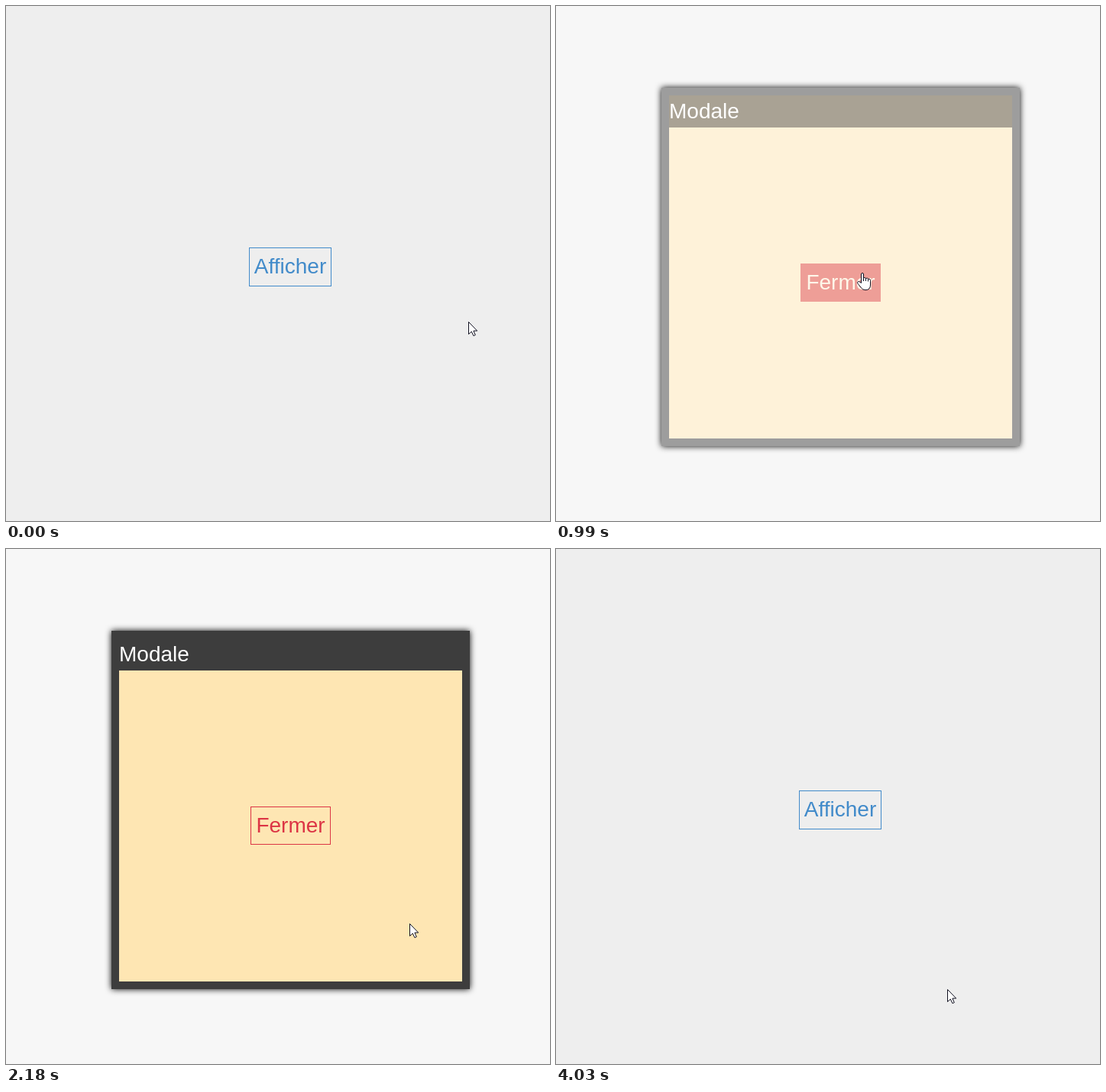
An HTML page for the animation above (4100 ms loop, 712 by 674 pixels).

```html
<!DOCTYPE html>
<html lang="fr">
<head>
<meta charset="utf-8">
<title>Modale</title>
<style>
  html, body { margin: 0; width: 100%; height: 100%; overflow: hidden; background: #eee; }
  svg { display: block; width: 712px; height: 674px; }
  text { font: 28px "Liberation Sans", Arial, sans-serif; }
  .cursor { fill: #fff; stroke: #101020; stroke-width: 1; stroke-linejoin: round; }
</style>
</head>
<body>
<svg viewBox="0 0 712 674">
  <defs>
    <filter id="blur" x="-10%" y="-10%" width="120%" height="120%">
      <feGaussianBlur stdDeviation="4"/>
    </filter>
  </defs>

  <rect id="page" width="712" height="674"/>

  <g id="open">
    <rect class="ring" fill="none" stroke="#428bca"/>
    <rect class="box" x="318.5" y="316.5" width="107" height="50" fill="#428bca" stroke="#428bca"/>
    <text x="372" y="350" text-anchor="middle">Afficher</text>
  </g>

  <g id="modal">
    <rect x="138" y="107" width="469" height="469" filter="url(#blur)"/>
    <rect x="138" y="107" width="469" height="469" fill="#fff"/>
    <g id="panel">
      <rect x="138" y="107" width="469" height="469" fill="#3d3d3d"/>
      <rect x="148" y="117" width="449" height="449" fill="#fff"/>
    </g>
    <rect id="body" x="148" y="117" width="449" height="449" fill="#fee6b3"/>
    <g id="content">
      <rect x="148" y="117" width="449" height="42" fill="#3d3d3d"/>
      <g id="close">
        <rect class="ring" fill="none" stroke="#dc3545"/>
        <rect class="box" x="320.5" y="337.5" width="104" height="49" fill="#dc3545" stroke="#dc3545"/>
        <text x="372.5" y="371" text-anchor="middle">Fermer</text>
      </g>
    </g>
    <text x="148" y="147" fill="#fff">Modale</text>
  </g>

  <g id="cursor" class="cursor">
    <path id="arrow" d="M.5 .5V16.5L4.3 13.1L6.9 18.6L9.3 17.6L6.9 12.1H11.7Z"/>
    <g id="hand">
      <path d="M-.5 13.5V2Q-.5.5 1 .5T2.5 2V7.5Q3 6.3 4.2 6.5Q5.5 6.7 5.5 8Q6 6.9 7.2 7.1Q8.5 7.4 8.5 8.8Q9 8 10 8.2Q11.5 8.6 11.5 10.5V16Q11.5 22.7 5 22.7Q1.2 22.7-.7 19.6L-4.8 14.5Q-6.3 12.4-4.6 11.6Q-3.2 11-.5 13.5Z"/>
      <path fill="none" d="M2.5 7.5V11M5.5 8V11M8.5 8.8V11.5"/>
    </g>
  </g>
  <circle id="click" r="12" fill="#ffd800" opacity=".6"/>
</svg>
<script>
const LOOP = 4100;
const OPENED = 740, CLOSED = 3480;
const CLICKS = { open: 600, close: 3290 };
const $ = id => document.getElementById(id);
const ramp = (t, from, to) => Math.max(0, Math.min(1, (t - from) / (to - from)));
const show = (el, on) => el.setAttribute('display', on ? 'inline' : 'none');
const mix = (a, b, k) => `rgb(${a.map((v, i) => Math.round(v + (b[i] - v) * k))})`;

// Each move jumps through its points at even intervals between two times.
const MOVES = [
  { from: -1, to: 0, points: [[605, 413]] },
  { from: 60, to: 540, points: [[600, 412], [580, 408], [540, 398], [490, 382], [445, 367], [418, 356], [404, 351], [400, 349]] },
  { from: 1540, to: 1800, points: [[410, 357], [445, 395], [490, 455], [520, 498], [527, 508]] },
  { from: 2180, to: 2640, points: [[528, 490], [530, 440], [528, 375], [525, 310], [505, 250], [486, 215], [500, 160], [522, 126]] },
  { from: 2740, to: 3210, points: [[530, 92], [515, 105], [470, 175], [410, 265], [390, 310], [382, 345], [379, 368], [378, 374]] },
  { from: 3290, to: 3291, points: [[378, 380]] },
  { from: 3880, to: 4030, points: [[410, 427], [465, 507], [512, 576]] }
];

function cursorAt(t) {
  const { from, to, points } = MOVES.filter(m => m.from <= t).pop();
  const last = points.length - 1;
  return points[Math.min(last, Math.floor((t - from) / (to - from) * last + 1e-6))] || points[last];
}

function makeButton(id, color) {
  const group = $(id);
  const box = group.querySelector('.box');
  const ring = group.querySelector('.ring');
  const label = group.querySelector('text');
  const [x, y, w, h] = ['x', 'y', 'width', 'height'].map(name => +box.getAttribute(name));
  return {
    contains: (px, py) => px >= x && px <= x + w && py >= y && py <= y + h,
    draw(hover, focus) {
      box.setAttribute('fill-opacity', hover);
      label.setAttribute('fill', mix(color, [255, 255, 255], hover));
      const size = 3 * focus, gap = 0.5 + size / 2;
      const attrs = { x: x - gap, y: y - gap, width: w + 2 * gap, height: h + 2 * gap,
        'stroke-width': size, 'stroke-opacity': focus / 2 };
      for (const name in attrs) ring.setAttribute(name, attrs[name]);
    }
  };
}

const openButton = makeButton('open', [66, 139, 202]);
const closeButton = makeButton('close', [220, 53, 69]);

function draw(t) {
  const modal = t >= OPENED && t < CLOSED;
  $('page').setAttribute('fill', modal ? '#f7f7f7' : '#eee');
  show($('modal'), modal);
  show($('open'), !modal);

  const fadeTime = 780 + Math.floor((t - 780) / 70) * 70;
  const fade = ramp(fadeTime, OPENED, 1240);
  $('panel').setAttribute('opacity', fade);
  $('body').setAttribute('opacity', fade);
  $('content').setAttribute('opacity', fade < 1 ? fade * 0.88 : 1);

  const openHover = t < OPENED ? ramp(t, 390, 540) : 0;
  const closeHover = t < 2000 ? 1 - ramp(t, 1580, 1750) : ramp(t, 3060, 3210);
  openButton.draw(openHover, t < OPENED ? ramp(t, CLICKS.open, CLICKS.open + 130) : 0);
  closeButton.draw(closeHover, ramp(t, CLICKS.close, CLICKS.close + 130));

  const [x, y] = cursorAt(t);
  const onButton = (modal ? closeButton : openButton).contains(x, y);
  $('cursor').setAttribute('transform', `translate(${x} ${y})`);
  show($('arrow'), !onButton);
  show($('hand'), onButton);

  const click = $('click');
  click.setAttribute('cx', x);
  click.setAttribute('cy', y);
  show(click, (t >= CLICKS.open && t < OPENED) || (t >= CLICKS.close && t < CLOSED));
}

const start = performance.now();
function tick() {
  draw((performance.now() - start) % LOOP);
  requestAnimationFrame(tick);
}
tick();
</script>
</body>
</html>
```
